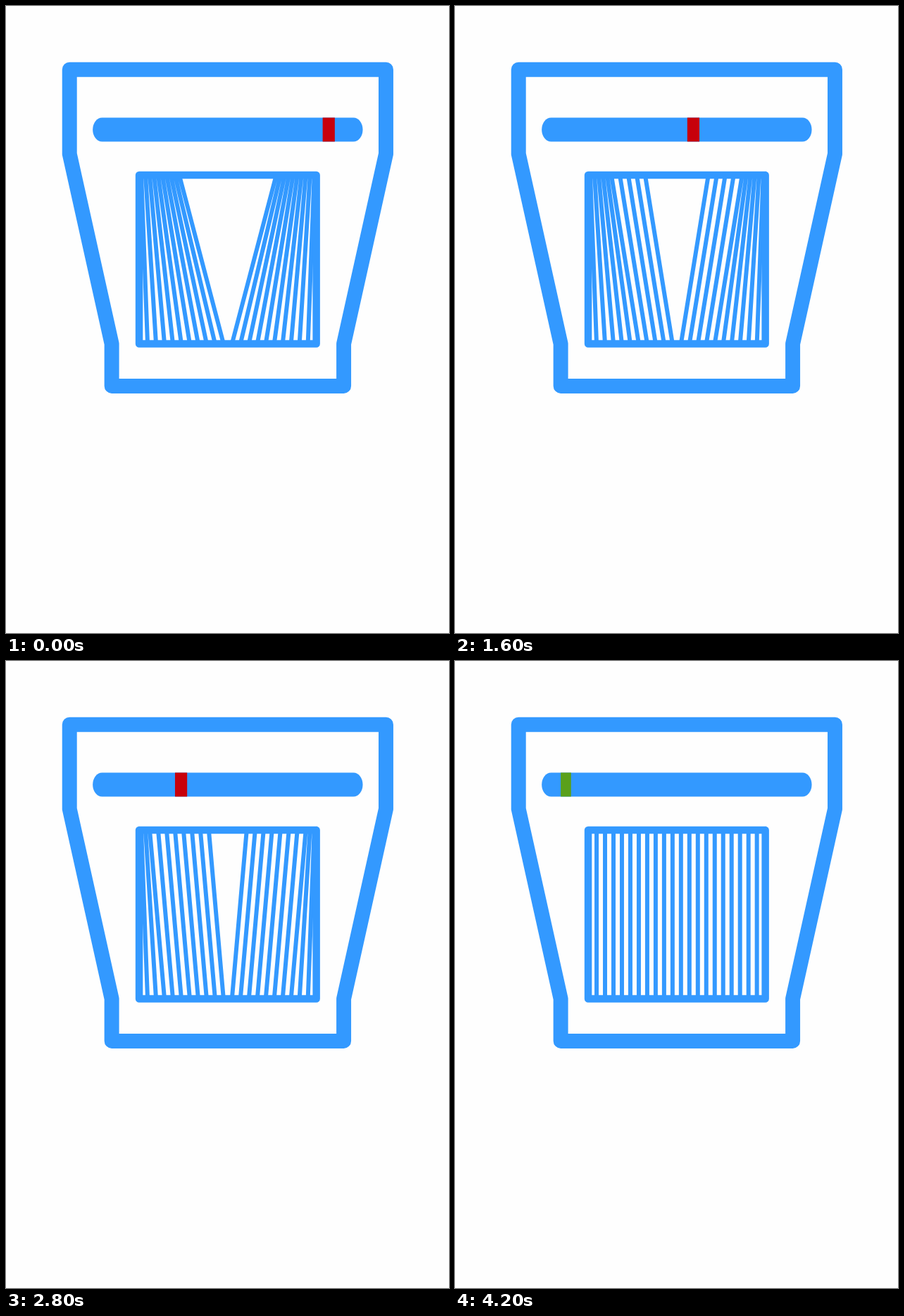
Recreate the animation shown at these times as an HTML page. Size 629x890 px, loop 4400 ms.

```html
<!DOCTYPE html>
<html>
<head>
<meta charset="utf-8">
<style>
  html, body { margin: 0; width: 100%; height: 100%; overflow: hidden; background: #fefefe; }
  svg { display: block; }
</style>
</head>
<body>
<svg width="629" height="890">
  <g transform="translate(314.85 90.2) scale(2.995)" fill="none" stroke="#39f" stroke-linejoin="round">
    <path stroke-width="7" d="M-75 0H75V40L55 130V150H-55V130L-75 40Z"/>
    <rect x="-64" y="22.8" width="128" height="11.35" rx="4.4" ry="5.67" fill="#39f" stroke="none"/>
    <rect id="marker" y="22.8" height="11.35" stroke="none"/>
    <path id="folds" stroke-width="2"/>
    <rect x="-42" y="50" width="84" height="80" stroke-width="3.5"/>
  </g>
</svg>
<script>
  const STEP_MS = 200, STEPS = 22, FOLDS = 10;
  const marker = document.getElementById('marker');
  const folds = document.getElementById('folds');

  function draw(step) {
    const left = STEPS - 1 - step;
    const closed = left === 0;
    marker.setAttribute('x', closed ? -55 : 45 - 5 * step);
    marker.setAttribute('width', closed ? 4.9 : 5.75);
    marker.setAttribute('fill', closed ? '#5aa01b' : '#c7000b');

    // Each fold is pulled outwards until it touches its outer neighbour.
    let d = '';
    for (let i = 0; i < FOLDS; i++) {
      const bottom = 2 + 4 * i;
      const top = bottom + Math.min(left, 21 - 2 * i);
      for (const side of [-1, 1]) d += `M${side * top} 50L${side * bottom} 130`;
    }
    folds.setAttribute('d', d);
  }

  function tick() {
    draw(Math.floor(performance.now() / STEP_MS) % STEPS);
    requestAnimationFrame(tick);
  }
  tick();
</script>
</body>
</html>
```
